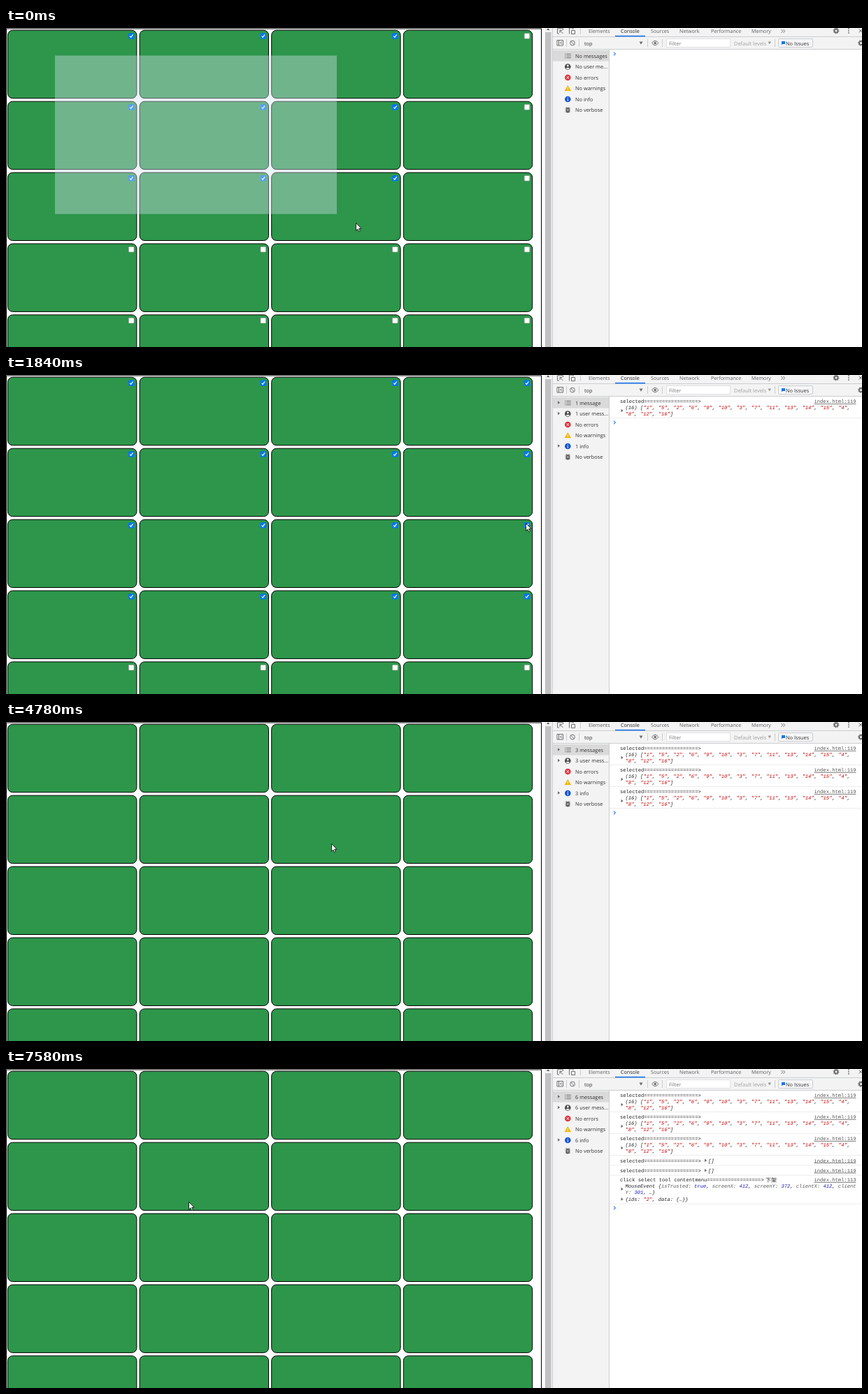
Recreate the animation shown at these times as an HTML page. Size 1224 px wide and 457 px high, loop 8 s.

```html
<!DOCTYPE html>
<html lang="zh">
<head>
<meta charset="utf-8">
<title>Drag select</title>
<style>
html, body { margin: 0; width: 100%; height: 100%; overflow: hidden; background: #fff; }
svg { display: block; width: 1224px; height: 457px; }
text { font: 7.4px "Open Sans", "Noto Sans", sans-serif; fill: #333; text-rendering: geometricPrecision; white-space: pre; }
.tabs text { font-size: 7.15px; fill: #5a5d61; }
.tabs .on { fill: #222; }
.log text { font: 7.15px "Liberation Mono", monospace; fill: #222; }
.log .it { font-style: italic; }
.log .link { fill: #545454; text-decoration: underline; }
.log .str { fill: #c80000; }
.log .num { fill: #1a1ab8; }
.log .key { fill: #565656; }
.log .zh { font: 8px "Noto Sans CJK SC", "Noto Sans CJK", sans-serif; }
.menu text { font: 10.4px "Noto Sans CJK SC", "Noto Sans CJK", sans-serif; fill: #111; }
.ic { fill: none; stroke: #6e6e6e; }
.tri { fill: #6e6e6e; }
.rule { stroke: #cbcdd1; }
</style>
</head>
<body>
<svg viewBox="0 0 1224 457">
  <!-- page -->
  <rect x=".5" y="1" width="765" height="500" fill="#fff" stroke="#000"/>
  <g id="cards"></g>
  <rect id="area" x="70" y="39.5" fill="rgb(212,225,238)" fill-opacity=".4"/>
  <rect x="770" width="11" height="457" fill="#f1f1f1"/>
  <rect x="771" y="6" width="8.5" height="451" fill="#c1c1c1"/>
  <path d="M773 3l2.2-2.4 2.2 2.4z" fill="#555"/>

  <!-- devtools frame -->
  <rect x="781" width="443" height="30" fill="#f3f3f3"/>
  <rect x="781" y="30" width="81" height="427" fill="#f3f3f3"/>
  <path class="rule" d="M781.5 0V457M781 12.5H1224M781 30.5H1224M862.5 30V457"/>
  <path class="rule" d="M801.5 16v11M819.5 16v11M917.5 16v11M938.5 16v11M1099.5 16v11M821.5 0v9"/>
  <rect x="871" y="10.8" width="43" height="1.6" fill="#1a73e8"/>
  <g class="tabs" id="tabs"></g>
  <g class="ic">
    <path d="M791 8h-2.5V.8h8V3M792 3.5l4.5 4.5M792 6.800V3.5h3.300M805.500 8.500V0h5.500v2M808.500 3.500h5v5h-5z"/>
    <circle cx="1187" cy="4" r="2.5" stroke-width="2"/>
    <circle cx="1187" cy="4" r="3.9" stroke-width="1" stroke-dasharray="1.5 1.56"/>
    <path d="M1219.500 1.500l5 5m0-5l-5 5"/>
    <path d="M788 17.500h8.500v7.500h-8.500zM790.500 17.500v7.500M795 19.500l-2.500 1.800 2.500 1.800"/>
    <circle cx="810" cy="21.500" r="3.400"/><path d="M807.700 19.200l4.600 4.600"/>
    <path d="M923.500 21.500q4.700-6.500 9.400 0q-4.700 6.500-9.400 0z"/>
    <circle cx="1222.500" cy="21.500" r="2.500" stroke-width="2"/>
    <circle cx="1222.500" cy="21.500" r="3.900" stroke-dasharray="1.5 1.56"/>
  </g>
  <g class="tri">
    <circle cx="1205" cy="1" r=".9"/><circle cx="1205" cy="4" r=".9"/><circle cx="1205" cy="7" r=".9"/>
    <circle cx="928.2" cy="21.500" r="1.800"/>
    <path d="M905.500 19.500h5l-2.500 4.300z"/><path d="M1089.500 19.500h4.600l-2.300 4z" fill="#999"/>
  </g>
  <text x="827" y="24.500">top</text>
  <rect x="944.500" y="15.500" width="91" height="12" fill="#fff" stroke="#e0e0e0"/>
  <text x="948" y="24.500" style="fill:#757575">Filter</text>
  <text x="1041" y="24.500" style="fill:#a0a0a0">Default levels</text>
  <rect x="1104.500" y="15.500" width="49" height="12" rx="1.500" fill="#f6f6f6" stroke="#cbcdd1"/>
  <path d="M1109 19h5v4h-3.500l-1.500 1.500z" fill="#1a73e8"/>
  <text x="1115" y="24.500">No Issues</text>

  <!-- message filter list -->
  <rect x="782" y="32" width="80" height="15.500" fill="#dadada"/>
  <path class="ic" d="M799 37.300h1.300m1 0h6.500M799 40h1.300m1 0h6.500M799 42.700h1.300m1 0h6.500"/>
  <circle cx="803.300" cy="55.500" r="4.300" fill="#4a4a4a"/>
  <circle cx="803.300" cy="54" r="1.400" fill="#fff"/><path d="M800.500 58q2.800-2.600 5.600 0q-2.800 2-5.600 0z" fill="#fff"/>
  <circle cx="803.300" cy="71" r="4.300" fill="#e5333b"/>
  <path d="M801.600 69.300l3.400 3.400m0-3.400l-3.400 3.400" stroke="#fff"/>
  <path d="M803.300 82l4.700 8.200h-9.400z" fill="#f0b400"/><path d="M803.300 85v2.500m0 .8v1" stroke="#fff"/>
  <circle cx="803.300" cy="102" r="4.300" fill="#1a56d0"/><path d="M803.300 99.500v1.200m0 .8v3.200" stroke="#fff"/>
  <path class="ic" d="M799.500 115h7.600m-7.600 2.500h7.600m-7.600 2.500h7.600m-6-7l1 1.500m3.300-1.500l-1 1.500" stroke-width=".9"/>
  <rect x="800.800" y="114" width="5" height="7.500" rx="2.500" fill="#555"/>
  <path d="M802 116.500h2.600m-2.600 2h2.600" stroke="#f3f3f3" stroke-width=".8"/>
  <g id="filters"></g>

  <g class="log" id="log"></g>
  <path id="prompt" d="M869-2.400l2.400 2.400-2.400 2.400" fill="none" stroke="#367cf1" stroke-width="1.100"/>

  <g class="menu" id="menu">
    <rect x="239" y="98" width="123" height="100" fill="#000" opacity=".22"/>
    <rect x="238" y="97" width="122.500" height="100" fill="#eee"/>
    <rect id="hover" x="238" width="122.500" height="20" fill="#fff"/>
  </g>
  <path id="arrow" d="M.5.500V11.300L2.900 9 4.500 12.700 6.300 11.900 4.700 8.300H8z" fill="#fff" stroke="#000" stroke-width=".8"/>
  <path id="hand" d="M-1.200 7.500V1.300Q-.2-.3.900 1.300V5q1.300-.8 2 .3 1.300-.6 1.900.5 1.600-.4 1.800 1V9.500L5.400 13H-.6L-3.700 8.500Q-3.400 6.400-1.200 8.300z" fill="#fff" stroke="#000" stroke-width=".8"/>
</svg>
<script>
const $ = id => document.getElementById(id);
const add = (id, html) => $(id).insertAdjacentHTML('beforeend', html);
const text = (x, y, s, cls = '') => `<text x="${x}" y="${y}" class="${cls}">${s}</text>`;
const tri = (x, y) => `<path class="tri" d="M${x} ${y - 2.2}l3.200 2.200-3.200 2.200z"/>`;
const show = (el, on) => el.setAttribute('visibility', on ? 'visible' : 'hidden');
const span = (cls, s) => `<tspan class="${cls}">${s}</tspan>`;

const LOOP = 8000, STEP = 120;
const RELEASE = 750, CLEAR = 4400, MENU = 6350, HAND = 6590, PICK = 7460, REST = 7580;
const logTimes = [RELEASE, 4280, CLEAR, MENU, PICK, PICK];
const promptY = [37, 68, 99, 130, 144, 158, 199];

// The picture updates in runs: [start, number of steps]
const runs = [[0, 2], [270, 7], [1240, 7], [2080, 2], [2340, 7], [3180, 2], [3560, 8],
  [4540, 3], [5030, 7], [5870, 7], [6710, 1], [6850, 3], [7460, 2]];

// Paths as [time, x, y]
const mouse = [[0, 500, 279], [120, 569, 316], [270, 617, 345], [390, 638, 359], [630, 656, 369],
  [750, 658, 366], [990, 748, 297], [1240, 746, 274], [1600, 744, 222], [1840, 743, 212],
  [1960, 857, 132], [2080, 884, 105], [2200, 901, 92], [2340, 880, 82], [2460, 800, 78],
  [2820, 490, 126], [3060, 382, 148], [3300, 397, 148], [3560, 404, 160], [3920, 440, 225],
  [4280, 457, 249], [4400, 454, 238], [4780, 465, 174], [5030, 430, 165], [5510, 107, 112],
  [5750, 176, 106], [6230, 238, 97], [6590, 239, 98], [6710, 246, 113], [6850, 257, 170],
  [6970, 259, 186], [7090, 261, 191], [7580, 261, 190]];
const corner = [[0, 473, 266.5], [120, 545, 304], [270, 608, 339], [390, 634, 356], [630, 657, 370.5]];

function along(path, t) {
  const i = path.findIndex(p => p[0] > t);
  if (i < 0) return path[path.length - 1].slice(1);
  const [a, b] = [path[i - 1], path[i]], k = (t - a[0]) / (b[0] - a[0]);
  return [a[1] + (b[1] - a[1]) * k, a[2] + (b[2] - a[2]) * k];
}

function snap(t) {
  const [start, n] = runs.filter(r => r[0] <= t).pop();
  return start + STEP * Math.min(n - 1, Math.floor((t - start) / STEP));
}

const cards = [];
for (let r = 0; r < 5; r++) for (let c = 0; c < 4; c++) {
  const x = 2.5 + c * 188.6, y = 3.300 + r * 101.9;
  add('cards', `<rect x="${x}" y="${y}" width="184.400" height="97.400" rx="7" fill="#2d964b" stroke="#000"/>
    <g transform="translate(${x + 172.5} ${y + 4})">
      <rect x=".4" y=".4" width="7.600" height="7.600" rx="1"/>
      <path d="M2 4.400l1.600 1.700 2.900-4" fill="none" stroke="#fff" stroke-width="1.200"/></g>`);
  const box = $('cards').lastElementChild;
  cards.push({ x, y, box, face: box.children[0], tick: box.children[1] });
}

for (const [x, s] of [[833, 'Elements'], [879, 'Console'], [922, 'Sources'], [963, 'Network'],
  [1008, 'Performance'], [1066, 'Memory']]) add('tabs', text(x, 7, s, s == 'Console' ? 'on' : ''));
add('tabs', '<path class="ic" d="M1108.500 2l2.300 2.400-2.300 2.400m3-4.800l2.300 2.400-2.300 2.400"/>');

['修改', '删除', '下发课程', '上架', '下架'].forEach((s, i) => add('menu', text(244.5, 111.4 + i * 20.1, s)));

// Console messages
const paint = s => s.replace(/"\d+"/g, q => span('str', q));
const head = (y, s, line) => text(878, y + 2.4, s) + text(1155.5, y + 2, 'index.html:' + line, 'link');
const rule = y => `<path d="M863 ${y}H1224" stroke="#ededed"/>`;
const bar = '='.repeat(18) + '&gt;';
const list = n => n.map(v => `"${v}"`).join(', ');
const ids = y => head(y, 'selected' + bar, 119) + tri(879.5, y + 13) +
  text(885.5, y + 11.2, paint(`(16) [${list([1, 5, 2, 6, 9, 10, 3, 7, 11, 13, 14, 15, 4])},`), 'it') +
  text(885.5, y + 20.4, paint(`${list([8, 12, 16])}]`), 'it') + rule(y + 23.5);
const none = y => head(y, 'selected' + bar, 119) + tri(999, y - .5) + text(1004, y + 2.4, '[]', 'it') + rule(y + 6.5);
const props = s => s.replace(/(\w+): (\w+)/g, (m, k, v) => span('key', k + ':') + ' ' + span('num', v));
const click = y => head(y, 'click select tool contentmenu' + bar, 113) + text(1086, y + 2.8, '下架', 'zh') +
  tri(879.5, y + 13) + tri(879.5, y + 27.5) +
  text(885.5, y + 11.2, 'MouseEvent {' + props('isTrusted: true, screenX: 412, screenY: 372, clientX: 412, ') + span('key', 'client'), 'it') +
  text(885.5, y + 20.4, props('Y: 301') + ', …}', 'it') +
  text(885.5, y + 29.6, paint('{ids: "2", data: {…}}'), 'it') + rule(y + 34);
[ids(38), ids(69), ids(100), none(131.5), none(145.7), click(159)].forEach(m => add('log', `<g>${m}</g>`));
const logs = [...$('log').children];

const filters = n => [n ? `${n} message${n > 1 ? 's' : ''}` : 'No messages', n ? `${n} user mess...` : 'No user me...',
  'No errors', 'No warnings', n ? n + ' info' : 'No info', 'No verbose']
  .map((s, i) => text(814, 42.6 + i * 15.5, s) + (n && [0, 1, 4].includes(i) ? tri(789, 39.500 + i * 15.5) : '')).join('');

let shown = -1;
function draw(time) {
  const t = snap(time), [x, y] = along(mouse, t), [cx, cy] = along(corner, t);
  cards.forEach(c => {
    const on = c.x < cx && c.y < cy;
    c.face.setAttribute('fill', on ? '#0075ff' : '#fff');
    c.face.setAttribute('stroke', on ? '#0075ff' : '#999');
    c.face.setAttribute('stroke-width', .7);
    c.tick.setAttribute('opacity', on ? 1 : 0);
    show(c.box, t < CLEAR);
  });
  $('area').setAttribute('width', cx - 70);
  $('area').setAttribute('height', cy - 39.5);
  show($('area'), t < RELEASE);

  const n = logTimes.filter(l => l <= t).length;
  if (n != shown) {
    shown = n;
    logs.forEach((g, i) => show(g, i < n));
    $('filters').innerHTML = filters(n);
    $('prompt').setAttribute('transform', `translate(0 ${promptY[n]})`);
  }

  const hand = t >= HAND && t < REST, open = t >= MENU && t < PICK;
  show($('menu'), open);
  show($('hover'), open && hand);
  $('hover').setAttribute('y', 97 + 20 * Math.floor((y - 97) / 20));
  for (const id of ['arrow', 'hand']) {
    $(id).setAttribute('transform', `translate(${x} ${y})`);
    show($(id), (id == 'hand') == hand);
  }
}

const start = performance.now();
(function tick() {
  draw((performance.now() - start) % LOOP);
  requestAnimationFrame(tick);
})();
</script>
</body>
</html>
```
